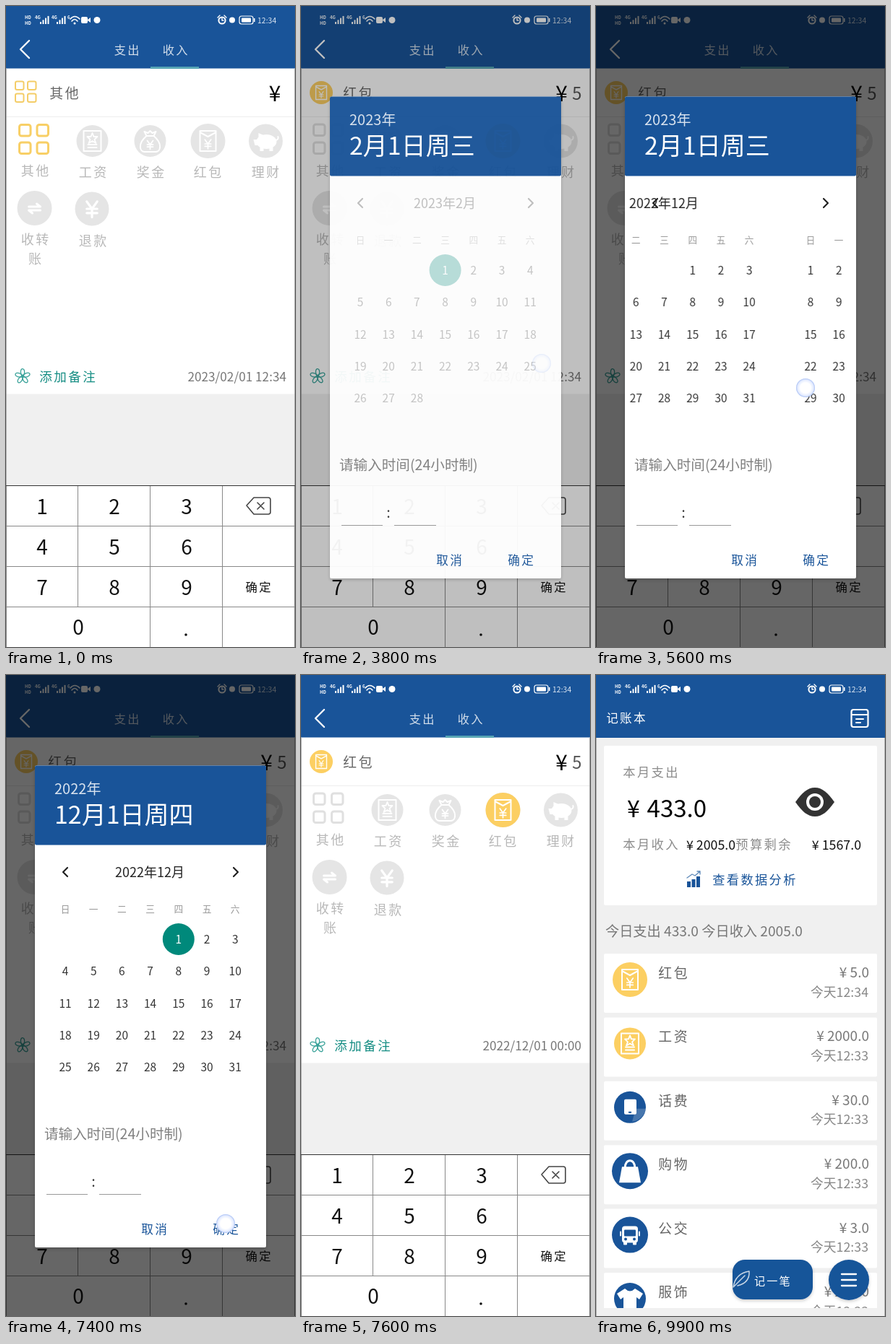
An HTML page that plays this animation: 400x888 px, repeating every 10 s.

```html
<!DOCTYPE html>
<html lang="zh-CN">
<head>
<meta charset="utf-8">
<title>记账本</title>
<style>
html, body { margin: 0; width: 100%; height: 100%; overflow: hidden; background: #fff; }
svg { display: block; width: 100%; height: 100%; }
text { font-family: "Noto Sans CJK SC", "Noto Sans CJK", sans-serif; white-space: pre; }
.airy { letter-spacing: .14em; }
</style>
</head>
<body>
<svg id="stage" viewBox="0 0 400 888"></svg>
<script>
const LOOP = 10000;
const BLUE = '#195499', TEAL = '#00897b', YELLOW = '#fccf62', PALE = '#e5e5e5';

// Drawing helpers; text is placed by the vertical centre of its line.
// Labels of Chinese characters alone are set smaller and airier at the same advance.
function text(s, x, y, pitch, fill, anchor = 'middle', weight = 300) {
  const airy = /^\p{Script=Han}+$/u.test(s);
  const size = airy ? pitch / 1.14 : pitch;
  const shift = airy ? size * 0.07 : 0;
  return `<text class="${airy ? 'airy' : ''}" x="${x + shift}" y="${y + size * 0.37}" font-size="${size}" fill="${fill}" text-anchor="${anchor}" font-weight="${weight}">${s}</text>`;
}
const left = (s, x, y, size, fill, weight) => text(s, x, y, size, fill, 'start', weight);
const right = (s, x, y, size, fill, weight) => text(s, x, y, size, fill, 'end', weight);
const rect = (x, y, w, h, fill, rx = 0, extra = '') =>
  `<rect x="${x}" y="${y}" width="${w}" height="${h}" rx="${rx}" fill="${fill}" ${extra}/>`;
const disc = (x, y, r, fill) => `<circle cx="${x}" cy="${y}" r="${r}" fill="${fill}"/>`;
const line = (d, stroke, w = 1) =>
  `<path d="${d}" fill="none" stroke="${stroke}" stroke-width="${w}" stroke-linecap="round" stroke-linejoin="round"/>`;
const shape = (d, fill) => `<path d="${d}" fill="${fill}"/>`;
const at = (x, y, body, scale = 1) => `<g transform="translate(${x} ${y}) scale(${scale})">${body}</g>`;
const group = (id, body, extra = '') => `<g id="${id}" ${extra}>${body}</g>`;
const range = n => [...Array(n).keys()];
const edges = () => rect(0, 87, 0.7, 801, '#999') + rect(399.3, 87, 0.7, 801, '#999');

const yen = (w = 2) => line('M-5 -7L0 0L5 -7M0 0V8M-5 0H5M-5 4H5', '#fff', w);

// White marks drawn around the middle of a disc.
const marks = {
  wage: line('M-12 -14H12V14H-12ZM-6 5H6M-6 9H6', '#fff', 2) +
    line('M0 -11L2 -6L7 -6L3 -2L5 3L0 0L-5 3L-3 -2L-7 -6L-2 -6Z', '#fff', 1.8),
  bag: line('M-5 -7C-18 4 -14 15 -8 15H8C14 15 18 4 5 -7ZM-5 -7L-8 -13L-3 -11L0 -14L3 -11L8 -13L5 -7', '#fff', 2) +
    at(0, 5, yen(2.2), 0.8),
  packet: line('M-11 -14H11V14H-11ZM-11 -12L0 -6L11 -12', '#fff', 2) + at(0, 4, yen(2), 0.85),
  pig: '<ellipse cx="1" cy="1" rx="14" ry="10" fill="#fff"/>' +
    shape('M-17 -2H-8V6H-15ZM-10 -11L-3 -8L-10 -3ZM-8 8H-3V14H-8ZM5 8H10V14H5Z', '#fff') +
    line('M14 -1Q18 -2 17 -6', '#fff', 2),
  swap: line('M-8 -2H8L3 -6M8 3H-8L-3 7', '#fff', 3),
  refund: at(0, 0, yen(2.2), 1.45),
  phone: rect(-8, -11, 17, 21, '#fff', 2) + rect(-2, 6, 4, 2, BLUE) +
    shape('M3 20A22 22 0 0 0 22 2L8 2Z', '#ffffff33'),
  shop: shape('M-11 -6H11L15 16H-15Z', '#fff') + line('M-7 -4C-7 -18 7 -18 7 -4', '#fff', 3),
  bus: rect(-11, -12, 22, 23, '#fff', 4) + rect(-8, -7, 16, 9, BLUE, 1) + disc(-6, 6, 2, BLUE) + disc(6, 6, 2, BLUE) +
    rect(-9, 9, 5, 5, '#fff', 1) + rect(4, 9, 5, 5, '#fff', 1) + line('M-13 -4V1M13 -4V1', '#fff', 2),
  shirt: shape('M-7 -14Q0 -7 7 -14L18 -7L13 1L9 -2V15H-9V-2L-13 1L-18 -7Z', '#fff')
};
const badge = (mark, x, y, r, fill, scale = 1) => disc(x, y, r, fill) + at(x, y, marks[mark], scale);

const tiles = (x, y, size, gap, color, w) => range(4).map(i =>
  rect(x + (i % 2) * (size + gap), y + (i >> 1) * (size + gap), size, size, 'none', size / 5,
    `stroke="${color}" stroke-width="${w}"`)).join('');

function statusBar() {
  const bars = x => range(4).map(i => rect(x + i * 3.5, 22 - i * 2.7, 2, 3 + i * 2.7, '#fff')).join('');
  return ['HD', 'HD'].map((s, i) => left(s, 26, 15.5 + i * 8, 6, '#fff', 700)).join('') +
    left('4G', 40, 16, 6, '#fff', 700) + bars(47) + left('4G', 63, 16, 6, '#fff', 700) + bars(70) +
    left('6', 85, 16, 6, '#fff', 700) +
    line('M89 18Q95 11 102 18M91 21Q95 16 99 21', '#fff', 1.6) + disc(95, 24, 1.5, '#fff') +
    rect(104, 15, 9, 9, '#fff', 2) + shape('M113 19L117 16V23L113 20Z', '#fff') +
    disc(126, 19.5, 4.5, '#fff') +
    `<circle cx="299" cy="20" r="4.6" fill="none" stroke="#fff" stroke-width="2"/>` +
    line('M299 17V20H301M293 16L296 13M305 16L302 13', '#fff', 1.4) +
    disc(313, 19.5, 4, '#fff') +
    rect(323, 14, 19, 11, 'none', 3, 'stroke="#fff" stroke-width="1.2"') + rect(326, 16.5, 13, 6, '#fff', 1) +
    rect(343, 17, 1.5, 5, '#fff') + left('12:34', 348, 20, 10.5, '#dce6f2');
}

function formPage() {
  const label = (s, x, y) => text(s, x, y, 20.5, '#b8b8b8');
  const petals = range(5).map(i =>
    `<ellipse cy="-6" rx="2.6" ry="4.4" fill="none" stroke="#37a198" stroke-width="1.3" transform="rotate(${i * 72})"/>`).join('');
  const keys = [...'123456789'].map((k, i) =>
    text(k, 50 + (i % 3) * 100, 694 + Math.floor(i / 3) * 56, 28, '#111')).join('');
  return rect(0, 0, 400, 888, '#fff') + rect(0, 0, 400, 86.5, BLUE) +
    line('M32 48L20 60L32 72', '#fff', 2.4) +
    text('支出', 167, 61, 18.5, '#d3deeb') + text('收入', 234, 61, 18.5, '#d3deeb') + rect(200, 84, 67, 3, '#58a6b5') +
    rect(0, 153, 400, 1, '#ededed') +
    group('chosenOther', tiles(13, 104.5, 11.5, 5.5, '#f4cd68', 2) + left('其他', 59, 121, 21.5, '#666') +
      tiles(18.5, 164.5, 15.5, 9, '#f8cf66', 3)) +
    group('chosenPacket', badge('packet', 28, 120, 16, YELLOW, 0.68) + left('红包', 57, 121, 21.5, '#666') +
      tiles(17.5, 164, 15.5, 9.5, '#e0e0e0', 3)) +
    label('其他', 40, 228) +
    badge('wage', 119.5, 187, 22, PALE) + label('工资', 120, 230) +
    badge('bag', 199.5, 187, 22, PALE) + label('奖金', 200, 230) +
    badge('packet', 279.5, 187, 24, PALE) + label('红包', 279, 230) +
    group('packetLit', badge('packet', 279.5, 187, 24, YELLOW)) +
    badge('pig', 359.5, 187, 23.5, PALE) + label('理财', 359, 230) +
    badge('swap', 39.5, 280, 24, PALE) + label('收转', 40, 323) + label('账', 40, 350) +
    badge('refund', 119, 281, 23.5, PALE) + label('退款', 120, 325) +
    group('empty', text('¥', 372, 121, 30, '#000', 'middle', 500)) +
    group('amount', text('¥', 360.5, 121, 30, '#000', 'middle', 500) + text('5', 382, 121, 24, '#555')) +
    at(23, 513, petals + disc(0, 0, 1.5, '#37a198')) + left('添加备注', 45, 514, 20, '#138c82') +
    group('dateBefore', right('2023/02/01 12:34', 388, 514, 17.2, '#777')) +
    group('dateAfter', right('2022/12/01 00:00', 388, 514, 17.2, '#777')) +
    rect(0, 537.5, 400, 126.5, '#f0f0f0') + edges() +
    `<path d="M0 720.5H400M0 776.5H400M0 832.5H400M99.5 664V832M199.5 664V888M299.5 664V888M.5 664V888M399.5 664V888" stroke="#888" fill="none"/>` +
    `<path d="M0 664.5H400" stroke="#333"/>` +
    keys + text('0', 100, 861, 28, '#111') + disc(249, 871, 1.8, '#111') + text('确定', 349, 805, 18.7, '#111', 'middle', 500) +
    line('M333 692L343 681H363Q366 681 366 684V701Q366 704 363 704H343ZM348 688L357 697M357 688L348 697', '#444', 1.6);
}

function homePage() {
  const entries = [
    ['红包', 'packet', YELLOW, '5.0', '12:34', 24],
    ['工资', 'wage', YELLOW, '2000.0', '12:33', 22],
    ['话费', 'phone', BLUE, '30.0', '12:33', 22],
    ['购物', 'shop', BLUE, '200.0', '12:33', 25],
    ['公交', 'bus', BLUE, '3.0', '12:33', 25],
    ['服饰', 'shirt', BLUE, '200.0', '12:33', 22]
  ];
  const cards = entries.map(([name, mark, color, sum, time, r], i) => at(0, i * 88.4,
    rect(11, 386, 378, 82, '#fff', 2) + badge(mark, 47, 422, r, color) + left(name, 85, 413, 21.5, '#666') +
    right('¥ ' + sum, 378, 412, 19, '#777') + right('今天' + time, 377, 439, 17.8, '#888'))).join('');
  return rect(0, 0, 400, 888, '#f0f0f0') + rect(0, 0, 400, 87, BLUE) +
    left('记账本', 13, 60, 18.9, '#fff', 500) +
    rect(353.5, 48, 23, 24, 'none', 3, 'stroke="#fff" stroke-width="2.2"') +
    line('M354 55H376M360 61H370M360 66H366', '#fff', 2) +
    rect(11, 98, 378, 221, '#fff', 2) +
    left('本月支出', 36, 135, 19.7, '#8c8c8c') +
    left('¥', 43, 185, 32, '#000', 500) + right('433.0', 153, 185, 33, '#000', 500) +
    shape('M276 176C285 163 293 156 303 156S321 163 330 176C321 189 313 196 303 196S285 189 276 176Z', '#333') +
    disc(303, 176, 12, '#fff') + disc(303, 176, 8, '#333') +
    left('本月收入', 36, 235, 19.7, '#8c8c8c') + left('¥ 2005.0', 125, 235, 17.8, '#111') +
    left('预算剩余', 192, 235, 19.7, '#8c8c8c') + right('¥ 1567.0', 367, 235, 17.8, '#111') +
    rect(126, 286, 5, 8, BLUE) + rect(132.5, 283, 5, 11, BLUE) + rect(139, 279, 5, 15, BLUE) +
    line('M126 281L133 276L137 278L144 272M140 272H144V276', '#5d88b8', 1.3) +
    left('查看数据分析', 160, 284, 19.6, BLUE) +
    left('今日支出 433.0 今日收入 2005.0', 13, 355, 19.2, '#777') +
    `<g clip-path="url(#listArea)">${cards}</g>` + edges() +
    rect(189, 810, 111, 55, BLUE, 17, 'filter="url(#shadow)"') +
    line('M190 848Q193 829 212 826Q213 842 196 846M190 848L206 832', '#c8d6e6', 1.5) +
    left('记一笔', 218, 839, 17.3, '#fff', 500) +
    `<g filter="url(#shadow)">${disc(350, 838, 28, BLUE)}</g>` +
    line('M340 830H360M340 838H360M340 846H360', '#fff', 2.3);
}

const column = i => 82 + i * 39.2;
const row = i => 366 + i * 44.4;

function month(title, first, days) {
  return text(title, 199, 273, 18, '#222') +
    [...'日一二三四五六'].map((d, i) => text(d, column(i), 324, 14.5, '#999')).join('') +
    range(days).map(i => text(i + 1, column((i + first) % 7), row(Math.floor((i + first) / 7)), 15.5, '#333')).join('');
}
const picked = col => disc(column(col), row(0), 22, TEAL) + text('1', column(col), row(0), 15.5, '#fff');

function dialog() {
  const heading = (year, day) => left(year, 67, 158, 20, '#d9e3ef') + left(day, 67, 193, 34, '#fff');
  return rect(40, 125.5, 320, 667.5, '#fff', 2, 'filter="url(#shadow)"') + rect(40, 125.5, 320, 110, BLUE, 2) +
    group('headBefore', heading('2023年', '2月1日周三')) + group('headAfter', heading('2022年', '12月1日周四')) +
    group('calendar',
      `<g clip-path="url(#pageArea)">` + group('pager',
        group('pressed', disc(column(2), row(4), 22, '#dedede')) + month('2023年2月', 3, 28) + picked(3) +
        at(-320, 0, month('2023年1月', 0, 31)) +
        at(-640, 0, month('2022年12月', 4, 31) + group('pickedAfter', picked(4)))) + '</g>' +
      line('M85 267L79 273L85 279M315 267L321 273L315 279', '#222', 2.2)) +
    left('请输入时间(24小时制)', 53, 636, 19.6, '#808080') +
    rect(56, 719, 57, 1, '#999') + rect(129, 719, 58, 1, '#999') + text(':', 121, 702, 20, '#333') +
    text('取消', 205, 768, 19, BLUE) + text('确定', 304, 768, 19, BLUE);
}

document.getElementById('stage').innerHTML = `<defs>
  <clipPath id="listArea"><rect y="380" width="400" height="497"/></clipPath>
  <clipPath id="pageArea"><rect x="40" y="236" width="320" height="370"/></clipPath>
  <filter id="shadow" x="-20%" y="-20%" width="140%" height="150%"><feDropShadow dx="0" dy="2" stdDeviation="2" flood-opacity=".2"/></filter>
  <radialGradient id="glow"><stop offset=".55" stop-color="#fff"/><stop offset=".85" stop-color="#e3ebff"/><stop offset="1" stop-color="#a9c0f4"/></radialGradient>
</defs>` + homePage() + group('form', formPage()) + statusBar() +
  group('dim', rect(0, 0, 400, 888, '#000')) + group('dialog', dialog()) +
  group('touch', disc(0, 0, 13, 'url(#glow)'));

// Rows are [time, value, easing]; a row without easing holds until the next one.
function track(id, prop, rows) {
  const frames = rows.map(([t, value, easing = 'step-end']) => ({ offset: t / LOOP, [prop]: value, easing }));
  frames.push({ offset: 1, [prop]: rows[rows.length - 1][1] });
  document.getElementById(id).animate(frames, { duration: LOOP, iterations: Infinity });
}
const fade = (id, ...rows) => track(id, 'opacity', rows);
const slide = (id, ...rows) => track(id, 'transform', rows.map(([t, x, e]) => [t, `translate(${x}px, 0px)`, e]));
const swap = (before, after, time) => {
  fade(before, [0, 1], [time, 0]);
  fade(after, [0, 0], [time, 1]);
};

swap('chosenOther', 'chosenPacket', 1100);
fade('packetLit', [0, 0], [1100, 1]);
swap('empty', 'amount', 3200);
swap('dateBefore', 'dateAfter', 7500);
swap('headBefore', 'headAfter', 6900);
fade('pickedAfter', [0, 0], [6900, 1]);
fade('pressed', [0, 0], [4800, 1], [5000, 0]);
fade('dim', [0, 0], [3700, 0.1, 'linear'], [3800, 0.25, 'linear'], [4000, 0.6], [7500, 0.3], [7600, 0]);
fade('dialog', [0, 0], [3700, 0.5, 'linear'], [3800, 0.95, 'linear'], [3900, 1], [7500, 0.5], [7600, 0]);
fade('calendar', [0, 0], [3700, 0, 'linear'], [3800, 0.28, 'linear'], [4000, 1]);
slide('pager', [0, 0], [4800, 0, 'ease-in-out'], [5250, 320], [5300, 320, 'ease-in-out'], [5800, 640]);
slide('form', [0, 0], [8600, 0, 'ease-out'], [8950, 400]);

// Finger: [time, x, y, opacity, easing]
const finger = [
  [0, 303, 190, 0], [1000, 303, 190, 1], [1300, 303, 190, 0.5], [1400, 303, 190, 0],
  [2300, 323.5, 121, 1], [2600, 323.5, 121, 0.5], [2700, 323.5, 121, 0],
  [2900, 159, 747.5, 1], [3200, 159, 747.5, 0.5], [3300, 159, 747.5, 0],
  [3600, 333, 495, 1], [3800, 333, 495, 0.3], [3900, 333, 495, 0],
  [4800, 181, 529, 1, 'linear'], [5050, 290, 529, 1], [5150, 290, 529, 0],
  [5300, 181, 529, 1, 'linear'], [5550, 290, 529, 1], [5650, 290, 529, 0],
  [6800, 240, 367, 1], [7000, 240, 367, 0.5], [7100, 240, 367, 0],
  [7400, 304, 760, 1], [7500, 304, 760, 0.5], [7600, 304, 760, 0],
  [8300, 352.5, 793.5, 1], [8600, 352.5, 793.5, 0]
];
track('touch', 'transform', finger.map(([t, x, y, , e]) => [t, `translate(${x}px, ${y}px)`, e]));
track('touch', 'opacity', finger.map(([t, , , o, e]) => [t, o, e]));
</script>
</body>
</html>
```
